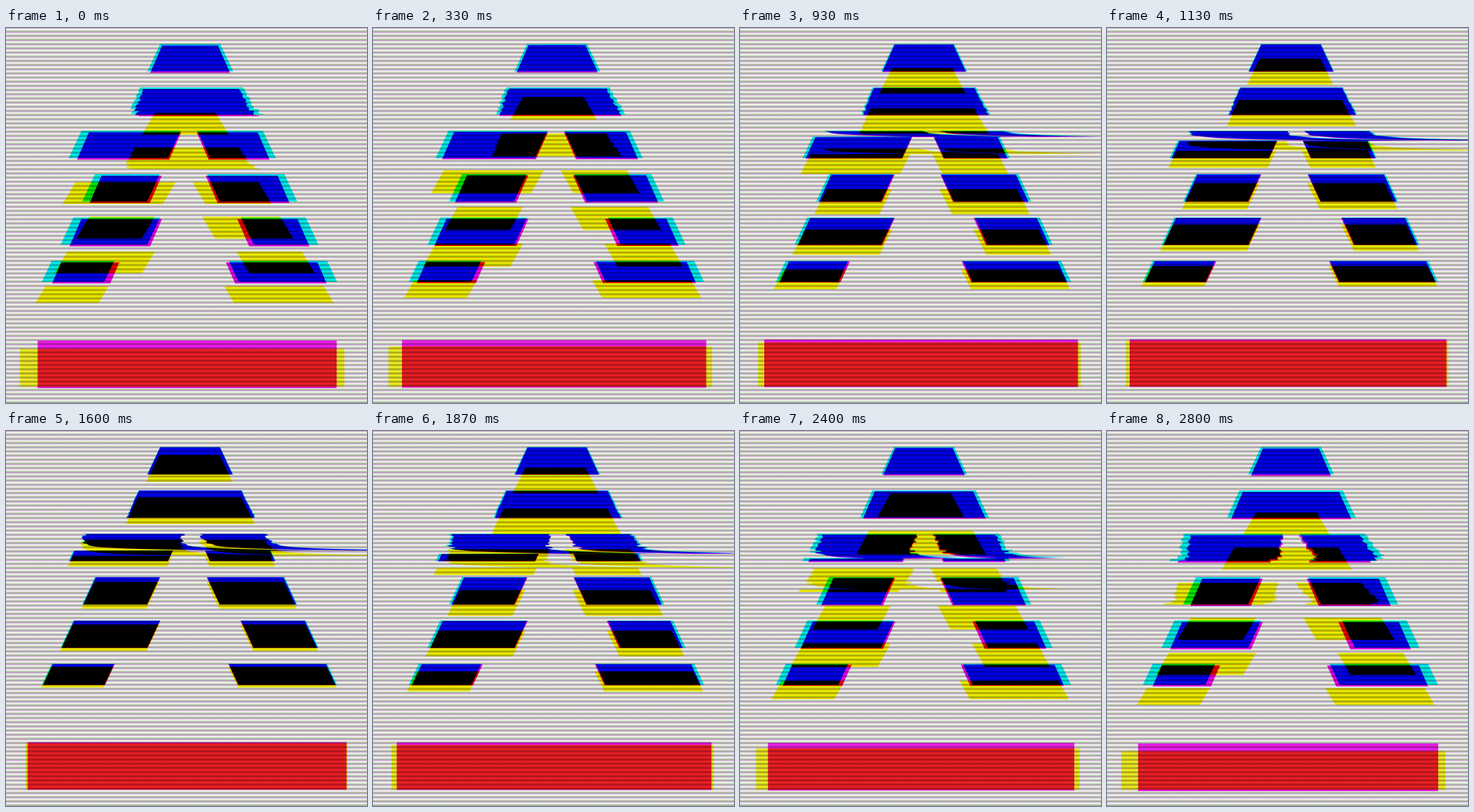
Recreate the animation shown at these times as an HTML page. Size 462 by 480 pixels, loop 2.87 s.

```html
<!DOCTYPE html>
<html lang="en">
<head>
<meta charset="utf-8">
<title>Letter A, split inks</title>
<style>
  html, body { margin: 0; width: 100%; height: 100%; overflow: hidden; background: #fff; }
  svg { position: absolute; left: 0; top: 0; display: block; filter: blur(0.6px); }
  path { mix-blend-mode: multiply; }
  #scan {
    position: absolute; left: 0; top: 0; width: 462px; height: 480px;
    mix-blend-mode: multiply;
    background: repeating-linear-gradient(#b794c0 0, #f0edec 1.4px, #f0edec 2.6px, #a9c99a 3.8px, #b794c0 5.333px);
  }
</style>
</head>
<body>
<svg width="462" height="480" viewBox="0 0 462 480">
  <rect width="462" height="480" fill="#fff"/>
  <path id="cyan" fill="#00ffff"/>
  <path id="magentaBar" fill="#ff20ff"/>
  <path id="magenta" fill="#ff00ff"/>
  <path id="yellowBar" fill="#ffff28"/>
  <path id="yellow" fill="#ffff00"/>
</svg>
<div id="scan"></div>
<script>
const LOOP = 2870, STEPS = 43, STEP = 1000 / 15;
const ROWS = 6, TOP = 20.5, PITCH = 55.5, ROW_HEIGHT = 35, LEAN = 0.47;
const BAR = { top: 398, bottom: 459, left: 26, right: 437.5, leanLeft: 0, leanRight: 0 };

// Widths of the left and right leg in the rows below the solid tip.
const LEGS = [[127, 84], [83, 99], [111, 83], [80, 126]];
const CROSSBAR_OVERHANG = 45;

function buildLetter() {
  const slabs = [];
  for (let row = 0; row < ROWS; row++) {
    const top = TOP + row * PITCH;
    const bottom = top + (row < ROWS - 1 ? ROW_HEIGHT : 27);
    const outerLeft = 197 - 27.7 * row, outerRight = 274 + 27.4 * row;
    const slab = (left, right, leanLeft, leanRight) =>
      slabs.push({ top, bottom, left, right, leanLeft, leanRight });
    const legs = LEGS[row - 2];
    if (!legs) {
      slab(outerLeft, outerRight, -LEAN, LEAN);
      continue;
    }
    const left = outerLeft - (row === 2 ? CROSSBAR_OVERHANG : 0);
    slab(left, left + legs[0], -LEAN, -LEAN);
    slab(outerRight - legs[1], outerRight, LEAN, LEAN);
  }
  return slabs;
}

function noise(row, step) {
  const s = Math.sin(row * 12.9898 + step * 78.233) * 43758.5453;
  return (s - Math.floor(s)) * 2 - 1;
}

// A tear line sinks down the letter; rows just above it are dragged right.
function tearShift(step) {
  const u = step / STEPS;
  const line = 115 + 49 * Math.sin(u * Math.PI / 2);
  const pull = 200 * Math.sin(u * Math.PI) ** 1.2;
  return y => {
    const above = line - y;
    if (above < 0) return 0;
    return pull * Math.exp(-above / 2)
      + 10 * Math.exp(-above / 22)
      + 7 * noise(Math.floor(y / 2), step) * Math.exp(-above / 22);
  };
}

function outline(slab, place, shift) {
  const left = [], right = [];
  const height = slab.bottom - slab.top;
  for (let d = 0; d <= height; d += 0.5) {
    const y = slab.top + d, dx = shift(y);
    left.push(place(slab.left + slab.leanLeft * d + dx, y));
    right.unshift(place(slab.right + slab.leanRight * d + dx, y));
  }
  return "M" + left.concat(right).map(p => p.map(v => v.toFixed(2)).join()).join("L") + "Z";
}

const letter = buildLetter();

function draw(ms) {
  const step = Math.min(STEPS - 1, Math.floor((ms + 4) / STEP));
  const spread = Math.abs(1 - step / (STEPS / 2));
  const shift = tearShift(step);
  const inks = {
    cyan: (x, y) => [x, y],
    magenta: (x, y) => [233 + (x - 233) * (1 - 0.07 * spread), y + 2 * spread],
    yellow: (x, y) => [x + (0.009 * x - 8.4) * spread, 460 - (460 - y) * (1 - 0.2 * spread)]
  };
  for (const [ink, place] of Object.entries(inks)) {
    const trace = slab => outline(slab, place, shift);
    document.getElementById(ink).setAttribute("d", letter.map(trace).join(""));
    const bar = document.getElementById(ink + "Bar");
    if (bar) bar.setAttribute("d", trace(BAR));
  }
}

const start = performance.now();
function tick() {
  draw((performance.now() - start) % LOOP);
  requestAnimationFrame(tick);
}
tick();
</script>
</body>
</html>
```
